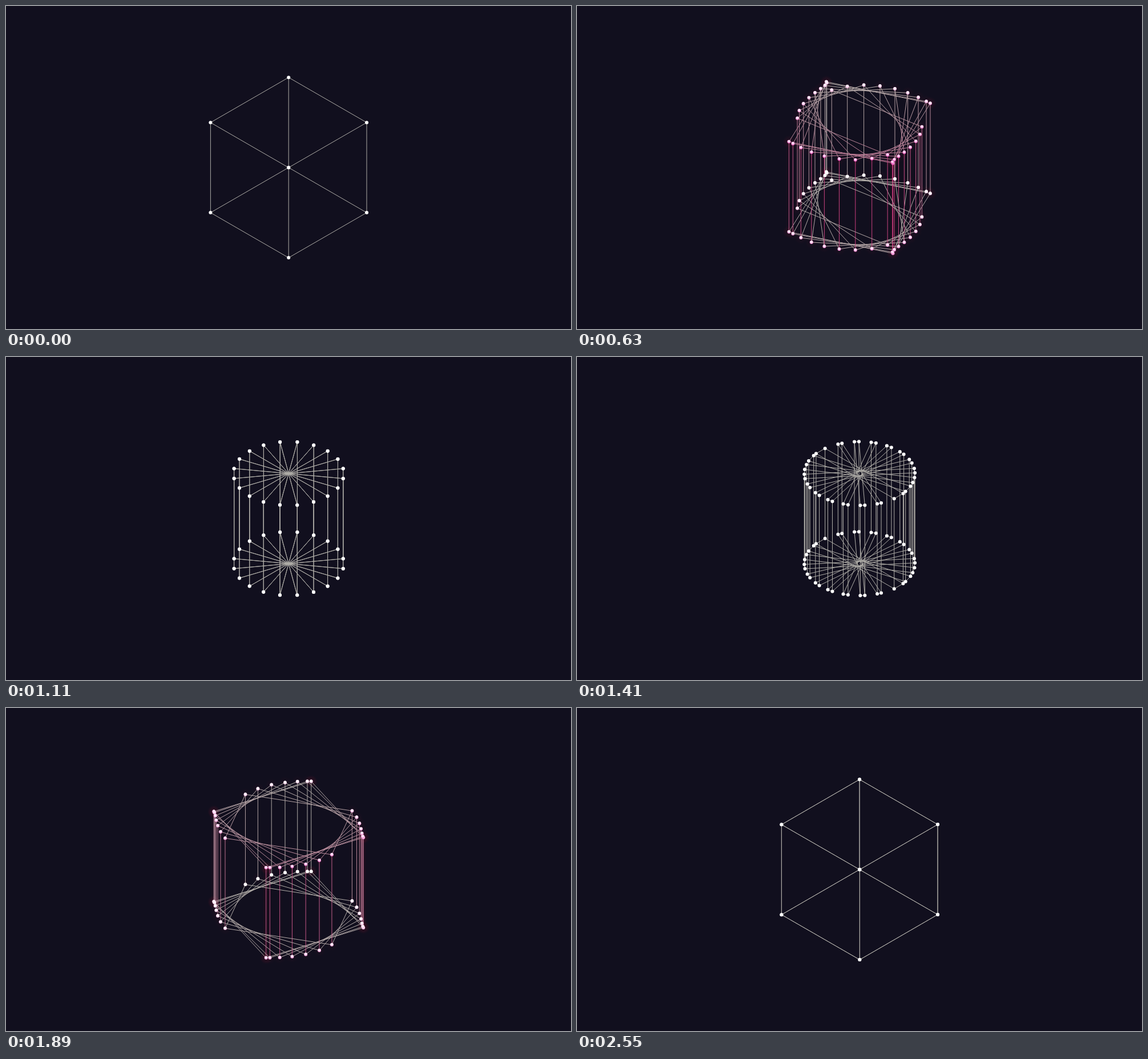
Write an HTML page with a canvas that moves like this. It is 990 by 566 pixels and loops after 2700 ms.

```html
<!DOCTYPE html>
<html lang="en">
<head>
<meta charset="utf-8">
<title>Folding cubes</title>
<style>
  html, body { margin: 0; width: 100%; height: 100%; overflow: hidden; background: #110f1e; }
  canvas { display: block; width: 990px; height: 566px; }
</style>
</head>
<body>
<canvas id="stage" width="990" height="566"></canvas>
<script>
const ctx = document.getElementById('stage').getContext('2d');
const LOOP = 2700, STEP = 30;
const CX = 495.2, TOP = 204.2, RISE = 157.9;
const HALF = 96.75, TILT = 1 / Math.sqrt(3);
const COUNT = 10, TURN = 18, LEAD = 4.4, POWER = 1.45;
const GREY = [176, 174, 168], PINK = [200, 52, 122], WHITE = [255, 255, 255], ROSE = [255, 160, 230];

// time, fold amount, slope per second
const FOLD = [
  [165, 0, 1], [420, 0.306, 1.3], [840, 0.839, 1.05], [1120, 1, 0],
  [1365, 1, -0.5], [1590, 0.804, -1.15], [1890, 0.425, -1.2], [2560, 0, 0]
];
// a half turn out, then the same half turn back
const SPIN = 835, SPIN_OUT = 137, SPIN_BACK = 1725;

const clamp = (x, a = 0, b = 1) => Math.min(b, Math.max(a, x));
const mix = (a, b, k) => a.map((v, i) => v + (b[i] - v) * k);
const rgb = (c, alpha = 1) => `rgba(${c.map(Math.round).join(',')},${alpha})`;

function foldAt(t) {
  const i = FOLD.findIndex(k => k[0] > t);
  if (i <= 0) return 0;
  const [t0, v0, m0] = FOLD[i - 1], [t1, v1, m1] = FOLD[i];
  if (v0 === v1) return v0;
  const d = t1 - t0, u = (t - t0) / d, w = 1 - u, s = d / 1000;
  return v0 * (1 + 2 * u) * w * w + m0 * s * u * w * w
       + v1 * u * u * (3 - 2 * u) - m1 * s * u * u * w;
}

function spinAt(t) {
  const out = Math.PI * clamp((t - SPIN_OUT) / SPIN);
  const back = Math.PI * clamp((t - SPIN_BACK) / SPIN);
  const speed = Math.sin(out) + Math.sin(back);
  return {
    angle: 45 + 90 * (Math.cos(out) - Math.cos(back)),
    glow: speed < 0.06 ? 0 : Math.min(1, speed * 1.3)
  };
}

// corners of one cube seen from above: screen x, y offset, nearness
function corners(angle, width) {
  const a = angle * Math.PI / 180, c = Math.cos(a), s = Math.sin(a);
  return [[1, -1], [1, 1], [-1, 1], [-1, -1]].map(([p, q]) => {
    const u = p * HALF, v = q * HALF * width;
    const depth = u * s + v * c;
    return { x: CX + u * c - v * s, y: depth * TILT, near: clamp(depth / 273.6 + 0.5) };
  });
}

function line(x0, y0, x1, y1, style, width = 1) {
  ctx.strokeStyle = style;
  ctx.lineWidth = width;
  ctx.beginPath();
  ctx.moveTo(x0, y0);
  ctx.lineTo(x1, y1);
  ctx.stroke();
}

function edge(a, b, base, tint) {
  let style = rgb(GREY);
  if (tint) {
    style = ctx.createLinearGradient(a.x, base + a.y, b.x, base + b.y);
    style.addColorStop(0, rgb(mix(GREY, PINK, tint * a.near)));
    style.addColorStop(1, rgb(mix(GREY, PINK, tint * b.near)));
  }
  line(a.x, base + a.y, b.x, base + b.y, style);
}

function disc(x, y, r, style) {
  ctx.fillStyle = style;
  ctx.beginPath();
  ctx.arc(x, y, r, 0, 2 * Math.PI);
  ctx.fill();
}

function halo(x, y, strength) {
  const g = ctx.createRadialGradient(x, y, 2, x, y, 11);
  g.addColorStop(0, `rgba(190,20,50,${strength})`);
  g.addColorStop(0.6, `rgba(190,20,50,${strength * 0.6})`);
  g.addColorStop(1, 'rgba(190,20,50,0)');
  disc(x, y, 11, g);
}

function dot(x, y, tint) {
  if (!tint) return disc(x, y, 3, '#fff');
  disc(x, y, 3, rgb(mix(WHITE, [232, 70, 180], tint)));
  disc(x, y - 0.7, 2.4, rgb(mix(WHITE, ROSE, tint * 0.5)));
}

function draw(t) {
  ctx.fillStyle = '#110f1e';
  ctx.fillRect(0, 0, 990, 566);

  const left = (1 - foldAt(t)) * (LEAD + COUNT - 1);
  const { angle, glow } = spinAt(t);
  const cubes = [];
  let resting = 0;
  for (let i = 0; i < COUNT; i++) {
    const p = Math.pow(clamp(1 - left / (LEAD + i)), POWER);
    if (p === 0 && resting++) continue;
    cubes.push({ pts: corners(angle - TURN * i * p, 1 - p), still: p === 0 });
  }

  if (glow) {
    for (const { pts, still } of cubes) {
      const k = glow * 0.045 * (still ? resting : 1);
      for (const c of pts) {
        halo(c.x, TOP + c.y, k);
        halo(c.x, TOP + RISE + c.y, k);
        line(c.x, TOP + c.y, c.x, TOP + RISE + c.y, `rgba(190,20,50,${k * c.near * 0.4})`, 9);
      }
    }
  }

  for (const { pts } of cubes) {
    pts.forEach((c, i) => {
      const next = pts[(i + 1) % 4];
      edge(c, next, TOP + RISE, glow * 0.1);
      edge(c, next, TOP, glow * 0.5);
      line(c.x, TOP + c.y, c.x, TOP + RISE + c.y, rgb(mix(GREY, PINK, glow * c.near)));
    });
  }

  for (const { pts } of cubes) {
    for (const c of pts) {
      dot(c.x, TOP + RISE + c.y, glow * c.near * 0.7);
      dot(c.x, TOP + c.y, glow * (0.3 + 0.7 * c.near));
    }
  }
}

const begin = performance.now();
function tick() {
  const t = (performance.now() - begin) % LOOP;
  draw(Math.floor(t / STEP) * STEP);
  requestAnimationFrame(tick);
}
tick();
</script>
</body>
</html>
```
